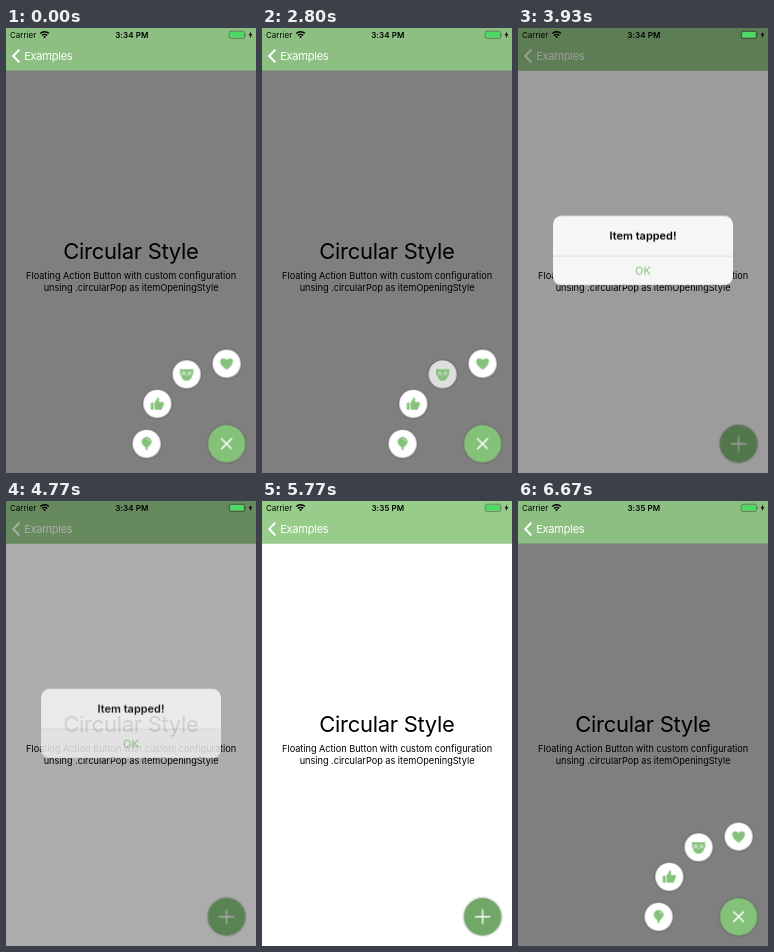
Write an HTML page that moves like this. It is 250x445 px and loops after 6760 ms.

```html
<!DOCTYPE html>
<html lang="en">
<head>
<meta charset="utf-8">
<title>Circular Style</title>
<style>
html, body { margin: 0; width: 100%; height: 100%; overflow: hidden; background: #fff; }
svg { display: block; width: 100%; height: 100%; font-family: Inter, "Liberation Sans", sans-serif; }
.mid { text-anchor: middle; }
.green { fill: #84c27a; }
.disc { fill: #fff; }
.lift { filter: drop-shadow(0 .7px 1px rgba(0, 0, 0, .4)); }

.dim, .shut, .pop, .pressed, .main, .cross, .early, .late, .shade, .alert, .tap {
  animation: 6760ms linear infinite;
}
.dim { animation-name: dim; }
.shut { animation-name: shut; animation-delay: calc(var(--out) * 20ms - 6760ms); }
.pop { animation-name: pop; animation-delay: calc(var(--in) * 100ms - 6760ms); }
.pressed .disc { animation: press 6760ms linear infinite; }
.main { animation-name: main; }
.cross { animation-name: cross; }
.early { animation-name: early; }
.late { animation-name: late; }
.shade { animation-name: shade; }
.alert { animation-name: alert; }
.tap { animation-name: tap; }

/* menu backdrop */
@keyframes dim {
  0% { opacity: .5; }
  52.219% { opacity: .5; animation-timing-function: ease-in-out; }
  56.657%, 91.27% { opacity: 0; }
  91.272% { opacity: .17; }
  91.716% { opacity: .255; animation-timing-function: ease-out; }
  93.49%, 100% { opacity: .5; }
}
@keyframes shut {
  0%, 52.219% { opacity: 1; transform: scale(1); }
  54.438% { opacity: 0; transform: scale(.4); }
  90.384% { opacity: 0; transform: scale(.4); }
  90.385%, 100% { opacity: 1; transform: scale(1); }
}
@keyframes pop {
  0%, 75% { opacity: 1; transform: scale(1); }
  75.001%, 90.311% { opacity: 0; transform: scale(.4); }
  91.272% { opacity: .75; transform: scale(.84); }
  91.716% { opacity: .95; transform: scale(.95); }
  92.308% { opacity: 1; transform: scale(1.06); }
  93.195% { opacity: 1; transform: scale(.99); }
  94.379%, 100% { opacity: 1; transform: scale(1); }
}
@keyframes press {
  0%, 41.419% { fill: #fff; }
  41.42%, 52.219% { fill: #dfdfdf; }
  53.5%, 100% { fill: #fff; }
}
@keyframes main {
  0%, 85.354% { fill: #84c27a; }
  85.355%, 91.271% { fill: #71a868; }
  91.272%, 100% { fill: #84c27a; }
}
@keyframes cross {
  0%, 52.219% { transform: rotate(-45deg); }
  53.6% { transform: rotate(3deg); }
  54.438%, 91.271% { transform: rotate(0deg); }
  91.272% { transform: rotate(-40deg); }
  91.716% { transform: rotate(-46deg); }
  92.308% { transform: rotate(-48deg); }
  93.195%, 100% { transform: rotate(-45deg); }
}
@keyframes early {
  0%, 85.354% { opacity: 1; }
  85.355%, 100% { opacity: 0; }
}
@keyframes late {
  0%, 85.354% { opacity: 0; }
  85.355%, 100% { opacity: 1; }
}
@keyframes shade {
  0% { opacity: 0; }
  52.219% { opacity: 0; animation-timing-function: cubic-bezier(.21, .32, .36, 1); }
  58.136% { opacity: .39; }
  69.97% { opacity: .39; animation-timing-function: cubic-bezier(.21, .32, .36, 1); }
  76.479%, 100% { opacity: 0; }
}
@keyframes alert {
  0% { opacity: 0; transform: scale(1.2); }
  52.219% { opacity: 0; transform: scale(1.2); animation-timing-function: cubic-bezier(.22, .3, .36, 1); }
  58.136% { opacity: 1; transform: scale(1); }
  69.97% { opacity: 1; transform: scale(1); animation-timing-function: cubic-bezier(.22, .3, .36, 1); }
  76.479%, 100% { opacity: 0; transform: scale(1); }
}
@keyframes tap {
  0%, 67.603% { opacity: 0; }
  67.604%, 69.97% { opacity: .06; }
  71.4%, 100% { opacity: 0; }
}
</style>
</head>
<body>
<svg viewBox="0 0 250 445" preserveAspectRatio="none">
  <rect width="250" height="445" fill="#fff"/>

  <!-- page -->
  <text class="mid" x="124.9" y="231.3" font-size="22" letter-spacing="-.3">Circular Style</text>
  <g class="mid" font-size="9.2" letter-spacing="-.03">
    <text x="125.1" y="251.4">Floating Action Button with custom configuration</text>
    <text x="125.1" y="262.5">unsing .circularPop as itemOpeningStyle</text>
  </g>
  <rect class="dim" y="42" width="250" height="403"/>

  <!-- menu items -->
  <g transform="translate(140.6 415.7)">
    <g class="shut" style="--out:3"><g class="pop" style="--in:0">
      <circle class="disc lift" r="14"/>
      <path class="green" d="M0 4.4C-2.8 3-5-.2-5-1.7a5 5 0 0 1 10 0C5-.2 2.8 3 0 4.4ZM-1.3 4h2.6l-.6 2.3h-1.4z"/>
      <path d="M.6-4.7q1.9.4 2.3 2.2" fill="none" stroke="#fff" stroke-width=".7"/>
    </g></g>
  </g>
  <g transform="translate(151.3 375.7)">
    <g class="shut" style="--out:2"><g class="pop" style="--in:1">
      <circle class="disc lift" r="14"/>
      <path class="green" d="M-6.5-1h2.8v7h-2.8zM-2.7-1L.6-6.4C2-6.3 2.2-5 1.4-1.8H5.4C6.8-1.8 6.8 0 6.3 1.2L4.6 5C4.3 5.6 4 6 3.2 6H-1.2C-2 6-2.7 5.4-2.7 4.8Z"/>
    </g></g>
  </g>
  <g transform="translate(180.6 346.3)">
    <g class="shut pressed" style="--out:1"><g class="pop" style="--in:2">
      <circle class="disc lift" r="14"/>
      <path class="green" d="M-6.6-5.6C-4-4.9 4-4.9 6.6-5.6C6.4-4.4 6.8-2.6 6.6-1C6.4 .6 5.6 1.2 5.2 2.4C4.4 5 2.2 6.5 0 6.5S-4.4 5-5.2 2.4C-5.6 1.2-6.4 .6-6.6-1C-6.8-2.6-6.4-4.4-6.6-5.6Z"/>
      <circle class="disc" cx="-2.9" cy="-1" r="1.8"/>
      <circle class="disc" cx="2.9" cy="-1" r="1.8"/>
      <circle class="green" cx="-2.9" cy="-1" r=".9"/>
      <circle class="green" cx="2.9" cy="-1" r=".9"/>
      <path class="disc" d="M-.8 1.1H.8L0 2.5z"/>
    </g></g>
  </g>
  <g transform="translate(220.6 335.6)">
    <g class="shut" style="--out:0"><g class="pop" style="--in:3">
      <circle class="disc lift" r="14"/>
      <path class="green" d="M0 6.2C-8.6 .2-7.2-5-3.6-5.3C-1.8-5.4-.5-4.4 0-3.4C.5-4.4 1.8-5.4 3.6-5.3C7.2-5 8.6 .2 0 6.2Z"/>
    </g></g>
  </g>

  <!-- main button -->
  <g transform="translate(220.6 415.7)">
    <circle class="main lift" r="18.7"/>
    <path class="cross" d="M-7.6 0H7.6M0-7.6V7.6" stroke="#fff" stroke-width="1.35"/>
  </g>

  <!-- navigation bar -->
  <rect width="250" height="42.6" fill="#97cc8b"/>
  <g class="dim"><rect width="250" height="42.6" fill-opacity=".13"/></g>
  <rect y="42.3" width="250" height=".4" fill-opacity=".12"/>
  <path d="M13.3 21.6L7.2 28L13.3 34.4" fill="none" stroke="#fff" stroke-width="2"/>
  <text x="18.2" y="32" font-size="11" letter-spacing="-.23" fill="#fff">Examples</text>

  <!-- alert -->
  <rect class="shade" width="250" height="445"/>
  <g transform="translate(125 222.6)">
    <g class="alert">
      <rect x="-90" y="-34.7" width="180" height="69.3" rx="8.5" fill="#f6f6f6"/>
      <path class="tap" d="M-90 5.4H90V26.1a8.5 8.5 0 0 1-8.5 8.5H-81.5a8.5 8.5 0 0 1-8.5-8.5z"/>
      <rect x="-90" y="5" width="180" height=".5" fill="#c6c6c8"/>
      <text class="mid" y="-10.7" font-size="11" font-weight="600">Item tapped!</text>
      <text class="mid green" y="24.4" font-size="11">OK</text>
    </g>
  </g>

  <!-- status bar, never dimmed -->
  <text x="4" y="9.6" font-size="8">Carrier</text>
  <path d="M34.3 5.6a6 6 0 0 1 8.6 0M36 7.5a3.7 3.7 0 0 1 5.2 0" fill="none" stroke="#000" stroke-width="1.4"/>
  <path d="M38.6 10.3l-1.4-1.5a2 2 0 0 1 2.8 0z"/>
  <g class="mid" font-size="8" font-weight="600" letter-spacing=".08">
    <text class="early" x="125.8" y="9.6">3:34 PM</text>
    <text class="late" x="125.8" y="9.6">3:35 PM</text>
  </g>
  <rect x="223.2" y="3.2" width="15.4" height="7.2" rx="1.6" fill="none" stroke="#000" stroke-opacity=".55" stroke-width=".6"/>
  <rect x="224.1" y="4.1" width="13.6" height="5.4" rx=".9" fill="#4cd964"/>
  <path d="M239.4 5.5q1.2 1.3 0 2.6z" fill-opacity=".55"/>
  <path d="M245.2 3.4L242.6 7.2H244.3L243.7 10.2L246.4 6.2H244.7z"/>
</svg>
</body>
</html>
```
